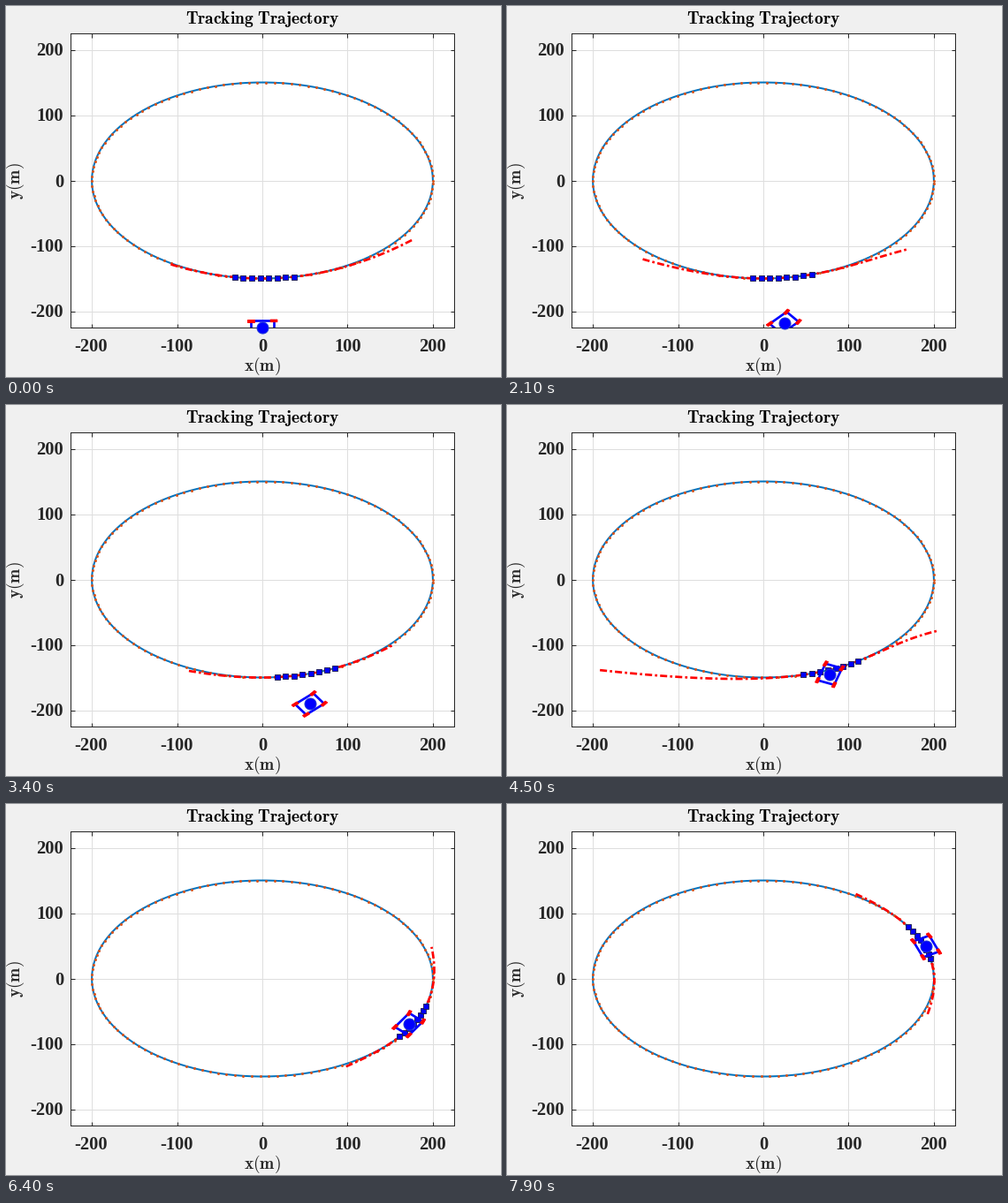
Recreate the animation shown at these times as a matplotlib script. Size 560 px wide and 420 px high, loop 8 s.

```python
import numpy as np
import matplotlib as mpl
import matplotlib.pyplot as plt
from matplotlib.animation import FuncAnimation

mpl.rcParams["mathtext.fontset"] = "cm"

W, H, DPI = 560, 420, 100
FRAMES, STEP = 80, 100
PX = 72 / DPI
INK = "#262626"
ACCEL = 11.3
HALF_L, HALF_W = 13.5, 10.3
MARGIN = 75


def hermite(t, times, vals, slopes):
    i = int(np.clip(np.searchsorted(times, t, "right") - 1, 0, len(times) - 2))
    dt = times[i + 1] - times[i]
    s = (t - times[i]) / dt
    return ((1 + 2 * s) * (1 - s) ** 2 * vals[i] + s * (1 - s) ** 2 * dt * slopes[i]
            + s * s * (3 - 2 * s) * vals[i + 1] + s * s * (s - 1) * dt * slopes[i + 1])


def rotate(points, angle):
    c, s = np.cos(angle), np.sin(angle)
    return np.asarray(points) @ np.array([[c, s], [-s, c]])


# reference ellipse
theta = np.arange(0, 2 * np.pi, 0.05)
path = np.column_stack([200 * np.cos(theta), 150 * np.sin(theta)])

# heading and position of the vehicle, speed growing steadily
turn_t = np.array([0, 1.4, 1.9, 2.7, 3.4, 3.9, 4.5, 5.45, 6.4, 7.2, 7.9])
turn = np.radians([0, 14, 36, 53, 38.6, 66, 70, 29, 52, 85, 115])
turn_rate = np.gradient(turn, turn_t)
turn_rate[0] = 0

pos_t = np.array([0, 1.4, 2.7, 3.4, 4.5, 6.4, 7.9])
pos = np.array([[0, -225], [10.5, -223], [37, -207], [55.5, -190.5],
                [78, -145], [172, -70], [191, 49]])
pos_psi = np.interp(pos_t, turn_t, turn)
vel = ACCEL * pos_t[:, None] * np.column_stack([np.cos(pos_psi), np.sin(pos_psi)])


def heading(t):
    return hermite(t, turn_t, turn, turn_rate)


def predict(window, here, psi, t):
    """Cubic fit of the window in the vehicle frame, extended both ways."""
    x, y = rotate(window - here, -psi).T
    ahead = np.interp(t, [0, 1.4, 1.9, 2.7], [138, 117, 122, MARGIN])
    xs = np.linspace(x.min() - MARGIN, x.max() + ahead, 80)
    ys = np.polyval(np.polyfit(x, y, 3), xs)
    return rotate(np.column_stack([xs, ys]), psi) + here


fig = plt.figure(figsize=(W / DPI, H / DPI), dpi=DPI, facecolor="#f0f0f0")
ax = fig.add_axes([73 / W, 1 - 364 / H, 434 / W, 333 / H])
ax.set(xlim=(-225, 225), ylim=(-225, 225))
ax.set_axisbelow(True)
ax.grid(color="#dedede", lw=1 * PX)
ticks = range(-200, 201, 100)
ax.set_xticks(ticks, [str(v) for v in ticks])
ax.set_yticks(ticks, [str(v) for v in ticks])
ax.tick_params(direction="in", top=True, right=True, length=4.5 * PX,
               width=1 * PX, color=INK, labelsize=0)
for spine in ax.spines.values():
    spine.set(color=INK, lw=1 * PX)
ax.tick_params(labelbottom=False, labelleft=False)


def label(x, y, s, size, **kw):
    fig.text(x / W, 1 - y / H, s, fontsize=size * PX, **kw)


tick_font = dict(family="Liberation Serif", weight="bold", color=INK)
for v in ticks:
    label(290 + 0.9644 * v - (3 if v < 0 else 0) + (2 if v < 0 else 0), 391, str(v), 20.5,
          ha="center", va="baseline", **tick_font)
    label(65, 204.5 - 0.74 * v, str(v), 20.5, ha="right", va="baseline", **tick_font)
label(290, 20, r"$\mathbf{Tracking\ Trajectory}$", 19.5, ha="center", va="baseline", color="black")
label(290, 413, r"$\mathbf{x(m)}$", 19.5, ha="center", va="baseline", color=INK)
label(11, 198, r"$\mathbf{y(m)}$", 19.5, ha="center", va="center", rotation=90, color=INK)

ax.plot(*path.T, color="#0072bd", lw=2 * PX)
ax.plot(*path.T, "o", color="#d95319", ms=3 * PX, mew=0)
marks, = ax.plot([], [], "s", ms=5.5 * PX, mfc="blue", mec="#1c1c50", mew=0.9 * PX, zorder=4)
fit, = ax.plot([], [], color="red", lw=2.67 * PX, ls=(0, (3, 1.2, 1, 1.2)),
               dash_capstyle="butt", zorder=3)
body, = ax.plot([], [], color="blue", lw=2.67 * PX, zorder=5)
wheels = [ax.fill([0, 0, 0], [0, 0, 0], fc="red", ec="red", lw=1 * PX, zorder=6)[0]
          for _ in range(4)]
center, = ax.plot([], [], "o", ms=13 * PX, mfc="blue", mec="#2038d8", mew=1 * PX,
                  zorder=7, clip_on=False)

corners = np.array([[1, 1], [-1, 1], [-1, -1], [1, -1]]) * [HALF_L, HALF_W]
tyre = np.array([[4, 1.7], [-4, 1.7], [-4, -1.7], [4, -1.7]])


def draw(n):
    t = n * STEP / 1000
    here, psi = hermite(t, pos_t, pos, vel), heading(t)
    nearest = np.argmin(((path - here) ** 2).sum(1))
    window = path[(nearest + np.arange(-3, 5)) % len(path)]
    marks.set_data(*window.T)
    fit.set_data(*predict(window, here, psi, t).T)

    frame = rotate(corners, psi) + here
    body.set_data(*np.vstack([frame, frame[:1]]).T)
    rate = (heading(min(t + 0.05, 7.9)) - heading(max(t - 0.05, 0))) / 0.1
    steer = np.clip(0.4 * rate, -0.5, 0.5)
    for wheel, hub, base in zip(wheels, frame, corners):
        wheel.set_xy(rotate(tyre, psi + (steer if base[0] > 0 else 0)) + hub)
    center.set_data([here[0]], [here[1]])
    return marks, fit, body, center, *wheels


anim = FuncAnimation(fig, draw, frames=FRAMES, interval=STEP, repeat=True,
                     repeat_delay=0, blit=False)
plt.show()
```
